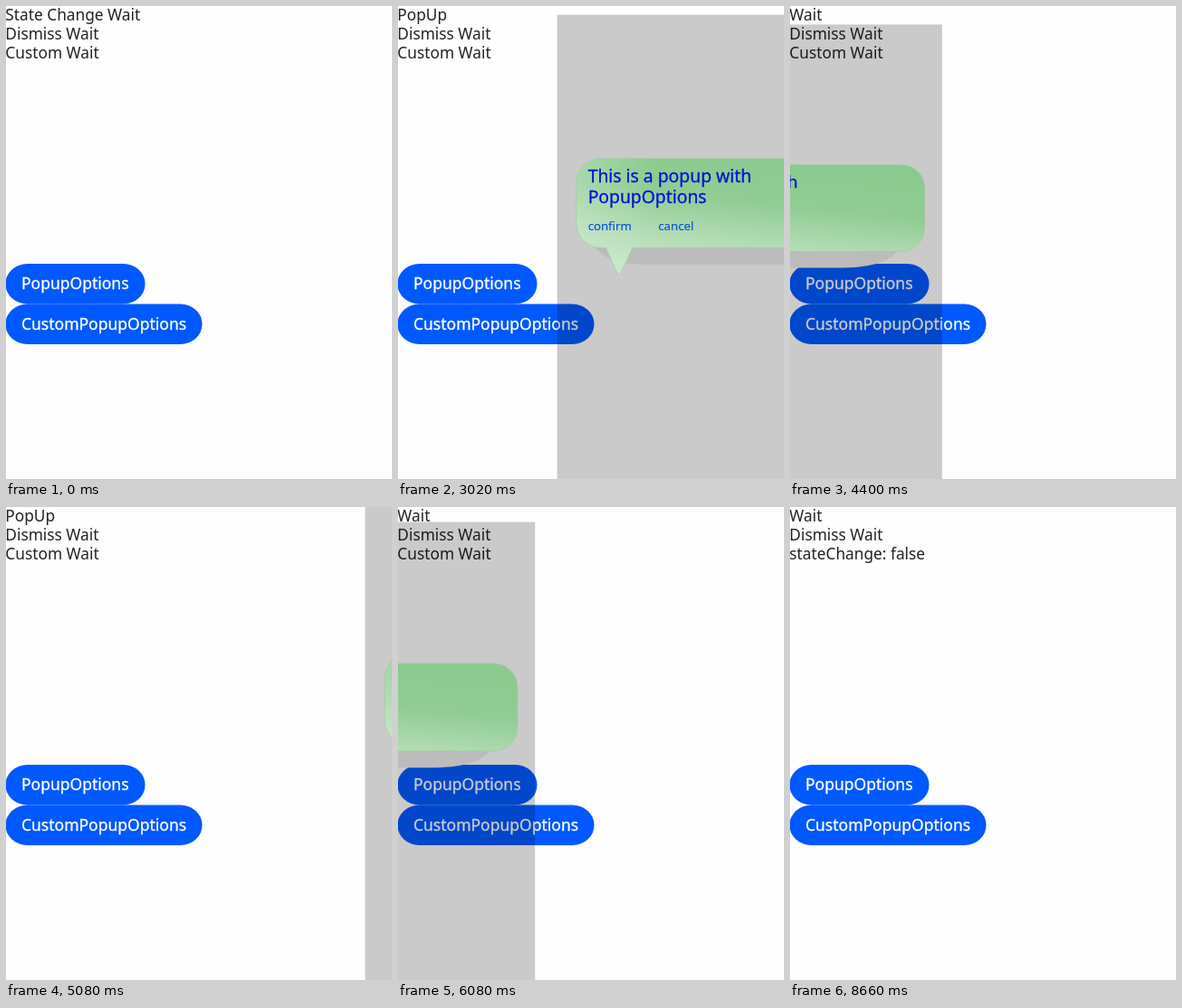
An HTML page for the animation above (8.86 s loop, 426 by 523 pixels).

```html
<!DOCTYPE html>
<html lang="en">
<head>
<meta charset="utf-8">
<title>Popup transitions</title>
<style>
  html, body { margin: 0; width: 100%; height: 100%; overflow: hidden; background: #fefefe; }
  svg { display: block; width: 100%; height: 100%; }
  text { font: 17.3px "Noto Sans", "Open Sans", sans-serif; fill: #222; white-space: pre; }
  .button rect { fill: #0059ff; }
  .button text { font-size: 17.5px; fill: #fff; stroke: #fff; stroke-width: .3; }
  .message { font-size: 21.8px; fill: #0010d8; stroke: #0010d8; stroke-width: .3; }
  .action { font-size: 14.9px; fill: #0a50d8; stroke: #0a50d8; stroke-width: .15; }
</style>
</head>
<body>
<svg viewBox="0 0 426 523">
  <defs>
    <linearGradient id="green" gradientUnits="userSpaceOnUse" x1="225" y1="136" x2="210" y2="280">
      <stop offset="0" stop-color="#8bca8f"/>
      <stop offset=".35" stop-color="#90cc93"/>
      <stop offset=".72" stop-color="#b3dcb5"/>
      <stop offset="1" stop-color="#c6e7c8"/>
    </linearGradient>
    <linearGradient id="glow">
      <stop offset="0" stop-color="#d0ecd2" stop-opacity=".4"/>
      <stop offset=".25" stop-color="#d0ecd2" stop-opacity="0"/>
    </linearGradient>
    <path id="bubble" d="M53 136H373a30 30 0 0 1 30 30V217a30 30 0 0 1-30 30H93L78.500 278q-2.500 4-5 0L60 247H53a30 30 0 0 1-30-30V166a30 30 0 0 1 30-30Z"/>
  </defs>

  <text id="state" x="-.7" y="16"></text>
  <text x="-.7" y="37">Dismiss Wait</text>
  <text id="custom" x="-.7" y="58"></text>

  <g class="button">
    <rect x="-.5" y="285" width="154" height="44.5" rx="24" ry="22"/>
    <text x="17" y="313">PopupOptions</text>
    <rect x="-.5" y="329.5" width="217" height="44.5" rx="24" ry="22"/>
    <text x="17" y="358">CustomPopupOptions</text>
  </g>

  <g id="optionsPopup">
    <rect y="-43" width="426" height="936" opacity=".205"/>
    <g transform="translate(.8 .3)">
      <path d="M44 244C58 262 76 268 110 268H292C332 268 356 262 372 244Z" fill="#bcbcbc"/>
      <use href="#bubble" fill="url(#green)"/>
      <use href="#bubble" fill="url(#glow)" stroke="#a3c9a5" stroke-width=".8"/>
      <text class="message" x="37.500" y="166">This is a popup with</text>
      <text class="message" x="37.500" y="192">PopupOptions</text>
      <text class="action" x="37.500" y="225">confirm</text>
      <text class="action" x="125" y="225">cancel</text>
    </g>
  </g>

  <g id="customPopup">
    <rect x="13" y="394" width="326" height="98" rx="46" fill="#f4f4f4"/>
    <path d="M19 413H94Q98 412 100 407L106.500 389q1.500-3 3 0L116 407Q118 412 122 413H333a10.800 10.800 0 0 1 0 21.600H19a10.800 10.800 0 0 1 0-21.600Z"
      fill="#ffe9e7" stroke="#f8d8d5" stroke-width=".8"/>
    <text x="116" y="430">Custom Popup</text>
  </g>
</svg>
<script>
const LOOP = 8860, SLIDE = 600, WIDTH = 426, CENTER_Y = 424;
const MIN_SCALE = 0.85, SHRINK_PART = 1 / 3;
const $ = id => document.getElementById(id);

// [enter start, exit start] in ms
const optionsVisits = [[2722, 4145], [4987, 5808]];
const customVisits = [[6850, 8045]];

// [time, text]: each text holds until the next one
const stateTexts = [[0, "State Change Wait"], [2700, "PopUp"], [4120, "Wait"], [4960, "PopUp"], [5780, "Wait"]];
const customTexts = [[0, "Custom Wait"], [6810, "stateChange: true"], [8020, "stateChange: false"]];

// cubic-bezier(.24, 0, .5, 1)
function ease(x) {
  if (x <= 0 || x >= 1) return x <= 0 ? 0 : 1;
  let low = 0, high = 1, u;
  for (let i = 0; i < 24; i++) {
    u = (low + high) / 2;
    const at = 3 * (1 - u) ** 2 * u * 0.24 + 3 * (1 - u) * u * u * 0.5 + u ** 3;
    if (at < x) low = u; else high = u;
  }
  return 3 * (1 - u) * u * u + u ** 3;
}

// Shrinks during the first third of a slide, then grows back.
function slideScale(x) {
  const shrink = ease(x / SHRINK_PART);
  const grow = ease((x - SHRINK_PART) / (1 - SHRINK_PART));
  return 1 - (1 - MIN_SCALE) * (shrink - grow);
}

function placePopup(node, visits, t) {
  const visit = visits.find(([enter, exit]) => t >= enter && t < exit + SLIDE);
  node.style.display = visit ? "" : "none";
  if (!visit) return;
  const [enter, exit] = visit;
  const leaving = t >= exit;
  const x = Math.min(1, (t - (leaving ? exit : enter)) / SLIDE);
  const shift = WIDTH * ((leaving ? 0 : 1) - ease(x));
  node.setAttribute("transform",
    `translate(${WIDTH / 2 + shift} ${CENTER_Y}) scale(${slideScale(x)}) translate(${-WIDTH / 2} ${-CENTER_Y})`);
}

function showText(node, steps, t) {
  node.textContent = steps.filter(([time]) => time <= t).pop()[1];
}

const start = performance.now();
function draw() {
  const t = (performance.now() - start) % LOOP;
  showText($("state"), stateTexts, t);
  showText($("custom"), customTexts, t);
  placePopup($("optionsPopup"), optionsVisits, t);
  placePopup($("customPopup"), customVisits, t);
  requestAnimationFrame(draw);
}
draw();
</script>
</body>
</html>
```
